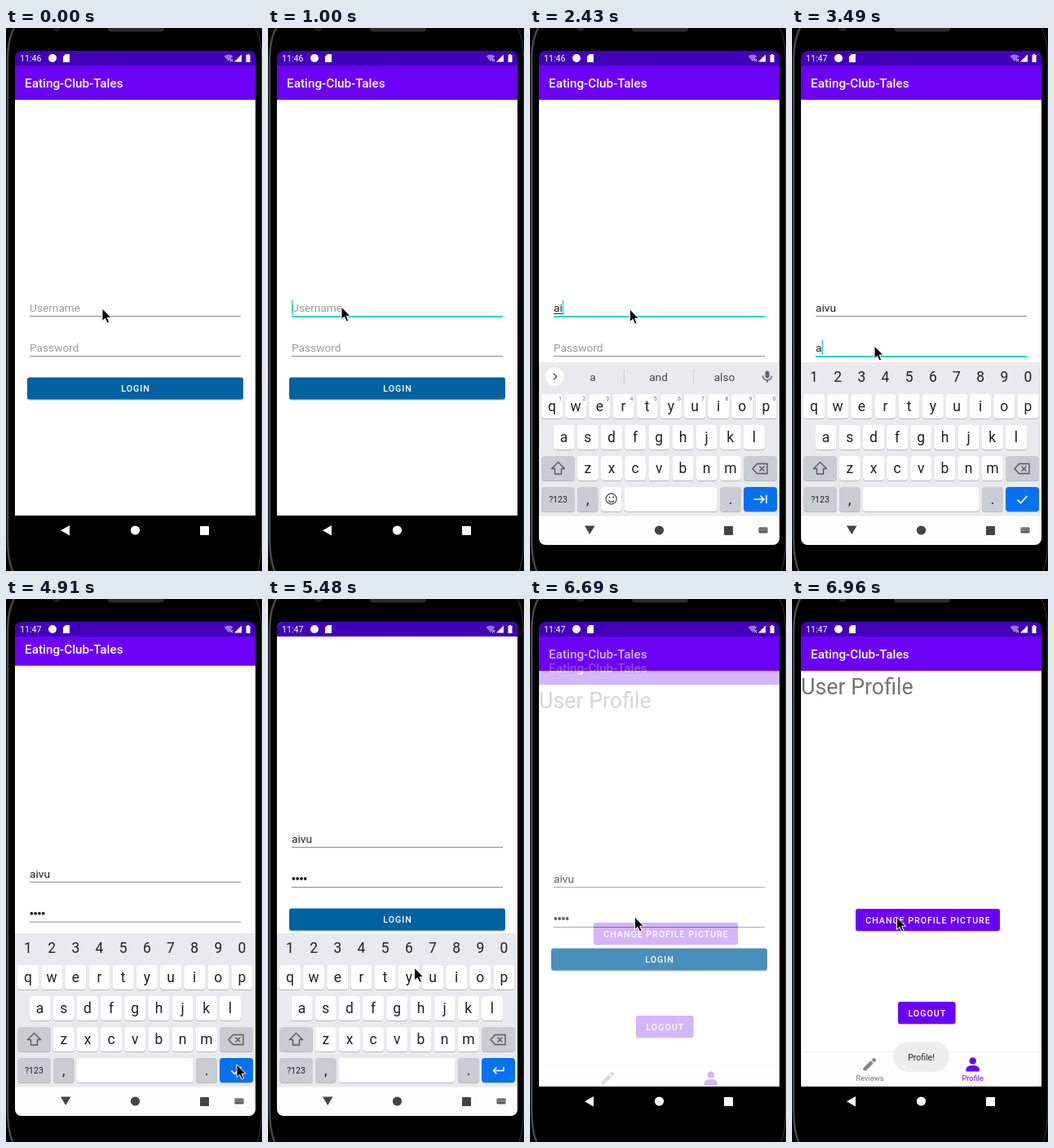
Recreate the animation shown at these times as an HTML page. Size 314 by 666 pixels, loop 8 s.

```html
<!DOCTYPE html>
<html lang="en">
<head>
<meta charset="utf-8">
<title>Login flow</title>
<style>
html, body { margin: 0; width: 100%; height: 100%; overflow: hidden; background: #000; }
svg { display: block; width: 314px; height: 666px; font-family: Roboto, sans-serif; }
.mid { text-anchor: middle; }
.caps { font-size: 10.7px; font-weight: 500; letter-spacing: .95px; fill: #fff; }
.title { font-size: 15.3px; font-weight: 500; fill: #fff; }
.field { font-size: 13.7px; fill: #222; }
.hint { font-size: 13.7px; fill: #9b9b9b; }
.key { font-size: 17.5px; fill: #202124; text-anchor: middle; }
.line { fill: none; stroke: #55595e; stroke-width: 1.4; }
</style>
</head>
<body>
<svg id="stage" viewBox="0 0 314 666"></svg>
<script>
const LOOP = 8000;
const PURPLE = '#6b00f5', TEAL = '#1fd7c4', INK = '#202124', GREY = '#c9ccd2';
const APP = 'Eating-Club-Tales';

// ---- markup helpers ----
const rect = (x, y, w, h, fill, r = 0, more = '') =>
  `<rect x="${x}" y="${y}" width="${w}" height="${h}" rx="${r}" fill="${fill}" ${more}/>`;
const dot = (x, y, r, fill) => `<circle cx="${x}" cy="${y}" r="${r}" fill="${fill}"/>`;
const text = (x, y, s, cls = '', more = '') => `<text x="${x}" y="${y}" class="${cls}" ${more}>${s}</text>`;
const line = (d, more = '') => `<path d="${d}" class="line" ${more}/>`;
const shape = (d, fill, more = '') => `<path d="${d}" fill="${fill}" ${more}/>`;
const group = (id, body, more = '') => `<g id="${id}" ${more}>${body}</g>`;

const button = (x, y, w, label, fill) =>
  rect(x, y + 1.2, w, 27, '#000', 3, 'opacity=".22"') + rect(x, y, w, 27, fill, 3) +
  text(x + w / 2 + .5, y + 17.5, label, 'caps mid');

const appBar = rect(11, 46, 295, 43, '#d9d9d9') + rect(11, 40, 295, 48, PURPLE) + text(23, 73, APP, 'title');

function keyCap(x, y, w, label = '', fill = '#fff', size = 17.5) {
  return rect(x, y + 1, w, 30, '#b5b8bd', 4) + rect(x, y, w, 30, fill, 4) +
    (label && text(x + w / 2, y + 15 + size * .34, label, 'key', `style="font-size:${size}px"`));
}

const PITCH = 29.17;
const row = (letters, x, y) => [...letters].map((c, i) => keyCap(x + i * PITCH, y, 26, c)).join('');
const digits = fn => [...'1234567890'].map((c, i) => fn(c, 27 + i * PITCH)).join('');

const mic = rect(288.5, 420.5, 5, 9, '#5f6368', 2.5) +
  line('M285.5 426.5a5.5 5.5 0 0 0 11 0M291 432v3');

const tools =
  line('M32 423.5l-3.5 4 3.5 4') +
  '<circle cx="67.5" cy="426" r="4" class="line"/>' + line('M70.5 429l4.5 4.5') +
  line('M106.500 421.500h9a1.500 1.500 0 0 1 1.500 1.500v6l-4 4h-6.500a1.500 1.500 0 0 1-1.500-1.500v-8.500a1.500 1.500 0 0 1 1.500-1.500zM108 428.500q3 3 5.500 0') +
  dot(109, 425.5, .9, '#55595e') + dot(113.5, 425.5, .9, '#55595e') +
  text(152.5, 431.3, 'GIF', 'mid', 'font-size="10.5" font-weight="700" fill="#55595e"') +
  line('M190.500 422h10v11.500h-10z') + rect(193, 420.5, 5, 3.5, '#55595e') +
  line('M192.500 427h6M192.500 430h4', 'stroke-width="1"') +
  rect(222, 419, 1, 18, '#d0d2d6') +
  [243.5, 248.5, 253.5].map(x => dot(x, 427.5, 1.4, '#55595e')).join('');

const words = line('M29 423.500l3.500 4-3.500 4') +
  rect(115, 419, 1, 18, '#cfd1d5') + rect(200, 419, 1, 18, '#cfd1d5') +
  [77, 157.5, 238.5].map((x, i) => text(x, 432.5, '', 'mid', `id="word${i}" font-size="13.7" fill="#44474b"`)).join('');

const navIcons = (fill, back) =>
  shape(back, fill) + dot(158.5, 616, 5.6, fill) + rect(238, 611, 11, 11, fill, .8);

const keyboard =
  rect(11, 410, 295, 189, '#e8eaed') + rect(11, 598.5, 295, 36, '#fdfdfd') +
  row('qwertyuiop', 14, 449) + row('asdfghjkl', 28.6, 487) + row('zxcvbnm', 57.8, 525) +
  keyCap(14, 525, 41, '', GREY) + keyCap(262, 525, 41, '', GREY) +
  line('M34.500 532.500l8 8h-4v6.500h-8v-6.500h-4z', 'stroke-linejoin="round"') +
  line('M278.500 534.500h12.500v12h-12.500l-5.500-6z M281.500 537.500l6 6m0-6l-6 6') +
  keyCap(14, 563, 41, '?123', GREY, 10.5) + keyCap(58, 563, 25.5, ',', GREY) +
  keyCap(233, 563, 26, '.', GREY) + keyCap(262, 563, 41, '', '#0772ee') +
  group('plain',
    digits((c, x) => text(x + 10, 456.5, c, 'mid', 'font-size="7" fill="#6b6f74"')) +
    keyCap(87, 563, 25.5) + keyCap(116, 563, 113.5) +
    '<circle cx="99.700" cy="577.500" r="6.500" class="line"/>' + line('M96.200 579.500q3.500 4 7 0') +
    dot(97.4, 575.5, 1, '#55595e') + dot(102, 575.5, 1, '#55595e') +
    dot(30.3, 427.5, 11.3, '#fff') + group('tools', tools) + group('words', words) + mic) +
  group('secret', digits((c, x) => text(x, 434, c, 'key')) + keyCap(87, 563, 142.5)) +
  group('tab', line('M274.500 578h12m-4-4.500l4.500 4.500-4.500 4.500M290 573v10', 'style="stroke:#fff;stroke-width:1.600"')) +
  group('check', line('M276.500 578.500l4 4 8-8.500', 'style="stroke:#fff;stroke-width:1.700"')) +
  group('enter', line('M289 574v4.500h-12.500m4-4l-4 4 4 4', 'style="stroke:#fff;stroke-width:1.600"')) +
  navIcons('#444', 'M67 610.500h12.500l-6.250 10.500z') +
  rect(280.5, 612.5, 11, 7, '#555', 1) +
  line('M281.500 614.500h9M281.500 616.500h9', 'style="stroke:#fdfdfd;stroke-width:.8;stroke-dasharray:1 1"');

const loginPage =
  rect(11, 40, 295, 620, '#fff') + appBar +
  text(29, 348, 'Username', 'hint', 'id="userHint"') + text(29, 348, '', 'field', 'id="user"') +
  rect(29, 350, 0, 1, '#222', 0, 'id="compose"') +
  text(29, 397, 'Password', 'hint', 'id="passHint"') + group('dots', '') +
  text(29, 397, '', 'field', 'id="lastChar"') +
  rect(29, 353, 259, 1, '#8a8a8a', 0, 'id="userLine"') +
  rect(29, 402, 259, 1, '#8a8a8a', 0, 'id="passLine"') +
  rect(29, 334, 1.5, 18, TEAL, 0, 'id="caret"') +
  button(26, 428.5, 265, 'LOGIN', '#0062a0') +
  group('pressed', button(26, 428.5, 265, 'LOGIN', '#0083b4'));

const profilePage =
  rect(11, 46, 295, 552, '#fff') + appBar +
  text(11, 117, 'User Profile', '', 'font-size="26.8" fill="#757575"') +
  button(78, 380, 177, 'CHANGE PROFILE PICTURE', PURPLE) + button(130, 494, 70.5, 'LOGOUT', PURPLE) +
  rect(11, 555, 295, 1, '#f0f0f0') + rect(11, 556, 295, 42, '#fdfdfd') +
  shape('M87.500 578.500v-3.300l9-9 3.300 3.300-9 9zM97.500 565.200l2-2q1-.8 2 0l1.300 1.300q.8 1 0 2l-2 2z', '#858585') +
  text(95.5, 590.5, 'Reviews', 'mid', 'font-size="9.3" fill="#757575"') +
  dot(221.7, 566.5, 4.2, PURPLE) + shape('M213.500 579.500v-2q0-5.500 8.200-5.500t8.200 5.500v2z', PURPLE) +
  text(221.7, 590.5, 'Profile', 'mid', `font-size="9.3" fill="${PURPLE}"`);

const statusBar =
  rect(11, 28, 295, 18, '#4100b8') +
  text(17, 41, '11:46', '', 'id="clock" font-size="10.7" fill="#fff"') +
  dot(57, 37, 5, '#fff') + shape('M73 32h5v10h-8v-7z', '#fff') +
  shape('M267.500 34.500q5.500-4 11 0l-5.500 6.800z', '#fff', 'opacity=".45"') +
  line('M275 38l3 3m0-3l-3 3', 'style="stroke:#fff;stroke-width:1"') +
  shape('M289 32.500v9h-9z', '#fff') + shape('M296 32h2v1h1.500v9h-5v-9h1.500z', '#fff');

const toast = rect(124, 543, 69, 37, '#eeeeee', 18.5) +
  text(158.5, 565.7, 'Profile!', 'mid', 'font-size="10.5" fill="#222"');

document.getElementById('stage').innerHTML =
  '<clipPath id="screen"><rect x="11" y="28" width="295" height="606" rx="8"/></clipPath>' +
  '<clipPath id="content"><rect x="11" y="28" width="295" height="570"/></clipPath>' +
  rect(0, 0, 314, 666, '#000') +
  line('M10 0C4 10 2 22 2 42V626C2 646 4 656 8 666', 'style="stroke:#43484c;stroke-width:2.500"') +
  line('M306 0C311 9 313.500 20 313.500 42V626C313.500 646 312 656 308 666', 'style="stroke:#24282b;stroke-width:1.500"') +
  dot(62, -1, 5, '#1d2024') + rect(125, -5, 69, 9.5, '#292b2d', 4) +
  `<g clip-path="url(#screen)">
    <g clip-path="url(#content)">${group('login', loginPage)}${group('profile', profilePage)}${statusBar}</g>
    ${group('keyboard', keyboard)}
    ${group('nav', rect(11, 598, 295, 36, '#000') + navIcons('#fff', 'M78 610v12.500l-11-6.250z'))}
    ${group('toast', toast)}
  </g>` +
  group('mouse', shape('M0 0V15.500L3.500 12.300 6.100 18 8.700 16.900 6.200 11.200H11Z', '#000',
    'stroke="#fff" stroke-width="1" stroke-linejoin="round"'));

// ---- timing ----
const ui = {};
document.querySelectorAll('[id]').forEach(e => ui[e.id] = e);
const set = (el, attrs) => Object.entries(attrs).forEach(([k, v]) => el.setAttribute(k, v));
const show = (el, on) => set(el, { opacity: +on });
const shift = (el, x, y) => set(el, { transform: `translate(${x} ${y})` });
const ramp = (t, a, b) => Math.min(1, Math.max(0, (t - a) / (b - a)));
const smooth = p => p * p * (3 - 2 * p);
const inOut = p => p < .5 ? 2 * p * p : 1 - 2 * (1 - p) ** 2;
const latest = (t, list) => list.reduce((v, [at, next]) => t >= at ? next : v, list[0][1]);

const userSteps = [[0, ''], [1720, 'a'], [2430, 'ai'], [2540, 'aiv'], [2650, 'aivu']];
const passSteps = [[0, ''], [3490, 'a'], [3570, 'ab'], [3750, 'abc'], [3930, 'abcd']];
const wordSteps = [[0, ['', '', '']], [1980, ['a', 'and', 'also']], [2560, ['ai', 'air', 'aid']], [3120, ['', '', '']]];
const mousePath = [[0, 118, 344], [150, 118, 344], [310, 90, 342], [1450, 90, 342], [1710, 122.5, 345],
  [2700, 122.5, 345], [3100, 101, 390], [3920, 101, 390], [4140, 237, 489], [4300, 237, 489],
  [4600, 283, 571], [5060, 283, 571], [5120, 264, 555], [5740, 128.5, 390]];

function mouseAt(t) {
  const i = mousePath.findIndex(p => p[0] > t);
  if (i < 0) return mousePath.at(-1).slice(1);
  const [a, x0, y0] = mousePath[i - 1], [b, x1, y1] = mousePath[i];
  const p = smooth(ramp(t, a, b));
  return [x0 + (x1 - x0) * p, y0 + (y1 - y0) * p];
}

function drawFields(t) {
  const focus = latest(t, [[0, ''], [1000, 'user'], [3010, 'pass'], [4680, '']]);
  const name = latest(t, userSteps), pass = latest(t, passSteps);
  const hidden = t >= 4680 ? pass.length : Math.max(0, pass.length - 1);
  const last = pass.slice(hidden);

  ui.user.textContent = name;
  ui.lastChar.textContent = last;
  show(ui.userHint, !name);
  show(ui.passHint, !pass);
  ui.dots.innerHTML = [...Array(hidden).keys()].map(i => dot(31.4 + i * 4.75, 392, 1.9, '#222')).join('');
  set(ui.lastChar, { x: 29 + hidden * 4.75 });

  const nameWidth = name ? ui.user.getComputedTextLength() : 0;
  const lastWidth = last ? ui.lastChar.getComputedTextLength() : 0;
  set(ui.compose, { width: t >= 1920 && focus === 'user' ? nameWidth : 0 });
  const focusLine = (el, y, on) =>
    set(el, { y, height: on ? 2 : 1, fill: on ? TEAL : '#8a8a8a' });
  focusLine(ui.userLine, 353, focus === 'user');
  focusLine(ui.passLine, 402, focus === 'pass');
  show(ui.caret, focus !== '');
  set(ui.caret, focus === 'pass'
    ? { x: 29 + hidden * 4.75 + lastWidth, y: 383 }
    : { x: 29 + nameWidth, y: 334 });
}

function drawKeyboard(t, open) {
  const secret = t >= 3250;
  shift(ui.keyboard, 0, 224 * (1 - open));
  show(ui.keyboard, open > 0);
  show(ui.nav, 0);
  set(ui.nav, { opacity: 1 - open });
  show(ui.plain, !secret);
  show(ui.secret, secret);
  show(ui.tools, t < 1920);
  show(ui.words, t >= 1920);
  latest(t, wordSteps).forEach((w, i) => ui['word' + i].textContent = w);
  show(ui.tab, t < 3280);
  show(ui.check, t >= 3280 && t < 5000);
  show(ui.enter, t >= 5000);
}

function draw(t) {
  const opening = 1 - (1 - ramp(t, 1250, 1600)) ** 1.7;
  const closing = smooth(ramp(t, 6360, 6680));
  const page = smooth(ramp(t, 6560, 6930));

  drawFields(t);
  drawKeyboard(t, opening * (1 - closing));
  shift(ui.login, 0, -49 * inOut(ramp(t, 4850, 5090)) * (1 - closing));
  set(ui.pressed, { opacity: ramp(t, 5880, 6050) * (1 - ramp(t, 6320, 6560)) });
  set(ui.profile, { opacity: page });
  shift(ui.profile, 0, 24 * (1 - page));
  set(ui.toast, { opacity: ramp(t, 6740, 6950) });
  ui.clock.textContent = t < 2900 ? '11:46' : '11:47';
  shift(ui.mouse, ...mouseAt(t));
}

const start = performance.now();
function tick() {
  draw((performance.now() - start) % LOOP);
  requestAnimationFrame(tick);
}
tick();
</script>
</body>
</html>
```
